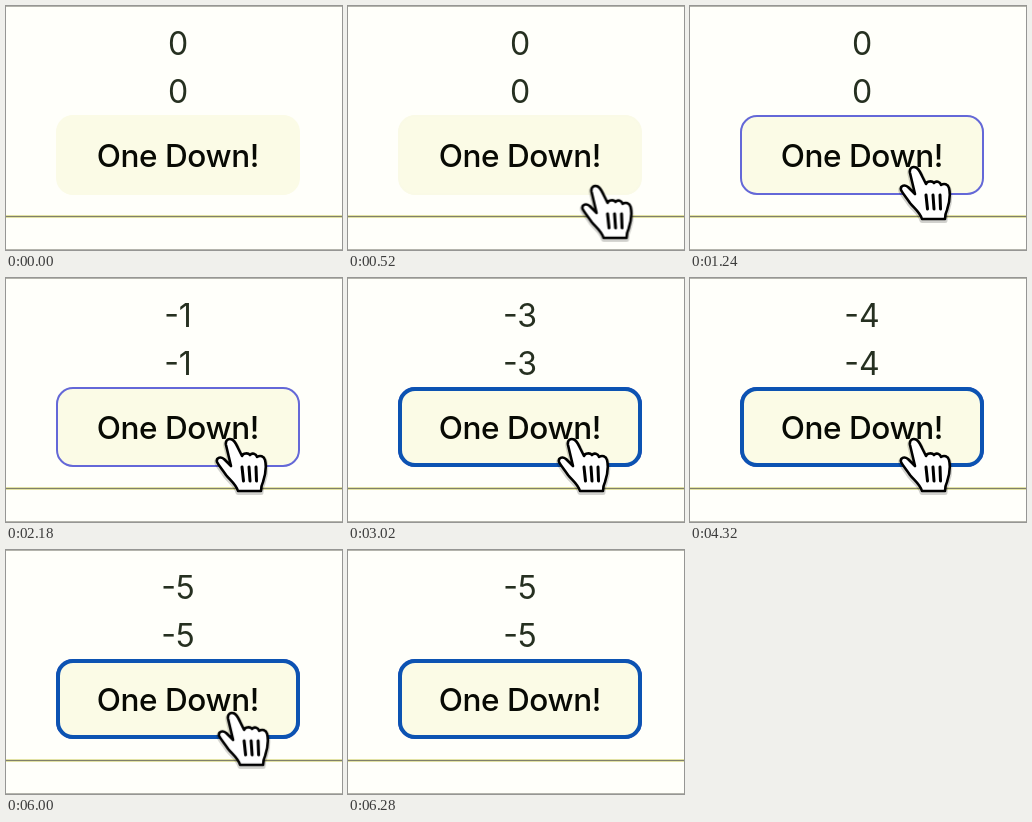
Write an HTML page that moves like this. It is 336 px wide and 244 px high and loops after 8 s.

```html
<!DOCTYPE html>
<html lang="en">
<head>
<meta charset="utf-8">
<title>One Down!</title>
<style>
  html, body { margin: 0; width: 100%; height: 100%; overflow: hidden; background: #fffffa; }
  body { position: relative; font: 400 32px/40px Inter, "Liberation Sans", sans-serif; }
  svg { position: absolute; left: 0; top: 0; }

  .count { position: absolute; left: 72px; width: 200px; height: 40px; overflow: hidden;
           text-align: center; color: #263020; }
  .count div { white-space: pre; animation: count 8s step-end infinite; }

  .label { font-weight: 500; font-size: 31.5px; letter-spacing: -.4px; fill: #080a04; text-anchor: middle; }
  .hover { animation: hover 8s linear infinite; }
  .focus { animation: focus 8s step-end infinite; }
  .hand  { animation: hand 8s linear infinite; }

  /* one line of the strip per click */
  @keyframes count {
    0%     { transform: translateY(0); }
    27.25% { transform: translateY(-40px); }
    32.75% { transform: translateY(-80px); }
    37%    { transform: translateY(-120px); }
    49%    { transform: translateY(-160px); }
    64%, 100% { transform: translateY(-200px); }
  }
  @keyframes hover {
    0%, 6.5% { opacity: 0; }
    8.5%     { opacity: .66; }
    11%, 100% { opacity: 1; }
  }
  @keyframes focus {
    0%  { opacity: 0; }
    32.75%, 100% { opacity: 1; }
  }
  @keyframes hand {
    0%, .25%  { transform: translate(352px, 250px); animation-timing-function: ease-out; }
    8.5%      { transform: translate(237.5px, 172px); animation-timing-function: ease-out; }
    14%, 74.75% { transform: translate(224px, 160px); }
    75.75%    { transform: translate(232px, 167px); }
    76.625%   { transform: translate(222px, 110px); }
    78.4%, 100% { transform: translate(192px, -70px); }
  }
</style>
</head>
<body>
<svg width="336" height="244" viewBox="0 0 336 244">
  <path d="M0 .5H336M0 243.5H336" stroke="#b4b4ac"/>
  <path d="M0 210.5H336" stroke="#e2e2a4" stroke-width="3"/>
  <path d="M0 210.5H336" stroke="#80806a"/>
  <rect x="50" y="109" width="244" height="80" rx="17" fill="#fbfbe6"/>
  <rect class="hover" x="51" y="110" width="242" height="78" rx="16" fill="none" stroke="#6468d8" stroke-width="2"/>
  <rect class="focus" x="52" y="111" width="240" height="76" rx="15" fill="none" stroke="#0c53b2" stroke-width="4"/>
  <text class="label" x="171.800" y="161">One Down!</text>
</svg>

<div class="count" style="top:18px"><div>0
-1
-2
-3
-4
-5</div></div>
<div class="count" style="top:66px"><div>0
-1
-2
-3
-4
-5</div></div>

<svg width="336" height="244" viewBox="0 0 336 244">
  <defs>
    <path id="outline" d="M-4 7C-5 2 -1 0 2 1.5C5 3 6 6 8 10L12 18C13 15 18 14.500 20 17C22 14.500 26 15.500 27 19C30 17 34 18 35 22C37 30 35 38 33 44C31.500 47 31 49 31 53L8 53C6 46 0 42 -4 37C-8 31 -11 28 -13 24C-14 20 -10 18 -6 21L1 28Z"/>
  </defs>
  <g class="hand" fill="none" stroke="#000" stroke-width="2.6" stroke-linejoin="round" stroke-linecap="round">
    <use href="#outline" y="1.500" stroke-opacity=".18" stroke-width="5"/>
    <use href="#outline" fill="#fff"/>
    <path d="M12 29L13.500 43M19 29L20 43M26 29L26.500 43" stroke-width="3"/>
  </g>
</svg>
</body>
</html>
```
